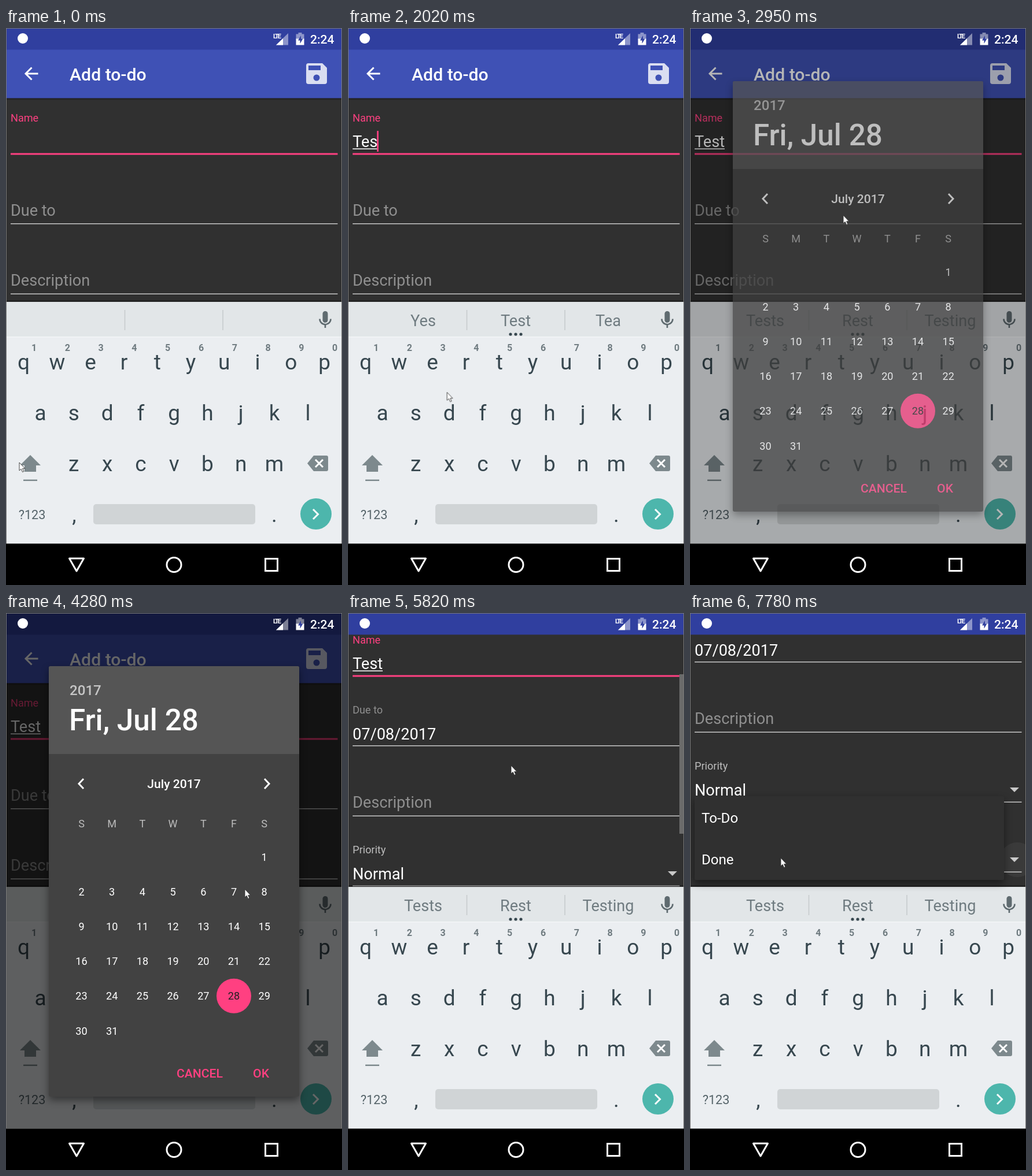
An HTML page that plays this animation: 581x964 px, repeating every 8 s.

```html
<!DOCTYPE html>
<html lang="en">
<head>
<meta charset="utf-8">
<title>Add to-do</title>
<style>
html, body { margin: 0; width: 100%; height: 100%; overflow: hidden; background: #000; }
svg { display: block; width: 100%; height: 100%; font-family: Roboto, "Open Sans", sans-serif; }
.mid { text-anchor: middle; }
.med { font-weight: 500; }
.f12 { font-size: 18.1px; }
.f14 { font-size: 21.1px; }
.f16 { font-size: 24.1px; }
.f18 { font-size: 27.1px; }
.white { fill: #fff; }
.hint { fill: #8f8f8f; }
.pink { fill: #ff4081; }
.rule { fill: #c8c8c8; }
.key { font-size: 37px; fill: #37474f; }
.sug { font-size: 27.1px; fill: #6f7b80; }
.line { fill: none; stroke: #fff; stroke-width: 3; }
.raised { filter: drop-shadow(0 2px 2px rgba(0, 0, 0, .4)); }
.floating { filter: drop-shadow(0 6px 7px rgba(0, 0, 0, .45)); }

#cursor, #scroll, #thumb, #dim, #dialog, #due, #menu, #ripple { animation: 8s linear infinite; }
#cursor { animation-name: cursor; }
#scroll { animation-name: scroll; }
#thumb { animation-name: thumb; }
#dim { animation-name: dim; }
#dialog { animation-name: dialog; }
#due { animation-name: due; }
#menu { animation-name: menu; }
#ripple { animation-name: ripple; transform-origin: 566px 427px; }

@keyframes cursor {
  0%, 1.6% { transform: translate(23px, 752px); }
  3.4%, 5.6% { transform: translate(35px, 755px); }
  10%, 13.1% { transform: translate(262px, 575px); }
  15.5%, 18.5% { transform: translate(165px, 573px); }
  22.5%, 24% { transform: translate(120px, 660px); }
  27.5%, 28.75% { transform: translate(262px, 578px); }
  32.25%, 35.4% { transform: translate(181px, 352px); }
  40.25%, 41.6% { transform: translate(455px, 261px); }
  43.25%, 46.75% { transform: translate(446px, 680px); }
  52.5%, 55.25% { transform: translate(413px, 478px); }
  56.25%, 58.7% { transform: translate(447px, 480px); }
  60.6%, 62.3% { transform: translate(440px, 790px); }
  65.4%, 67.4% { transform: translate(324px, 313px); }
  69% { transform: translate(286px, 373px); }
  72.5%, 74.6% { transform: translate(282px, 264px); }
  78%, 79% { transform: translate(280px, 119px); }
  84.25%, 88.75% { transform: translate(556px, 420px); }
  95%, 100% { transform: translate(157px, 424px); }
}
@keyframes scroll {
  0%, 69% { transform: none; }
  72.5%, 74.6% { transform: translateY(-109px); }
  78%, 100% { transform: translateY(-254px); }
}
@keyframes thumb {
  0%, 69% { transform: none; opacity: 0; }
  69.3% { opacity: 1; }
  72.5%, 74.6% { transform: translateY(69px); }
  78% { transform: translateY(161px); }
  81% { opacity: 1; }
  84%, 100% { transform: translateY(161px); opacity: 0; }
}
@keyframes dim {
  0%, 35.4% { opacity: 0; }
  38.5%, 62.3% { opacity: .6; }
  65.4%, 67.2% { opacity: .18; }
  69%, 100% { opacity: 0; }
}
@keyframes dialog {
  0%, 35.4% { opacity: 0; }
  37.5%, 62.3% { opacity: 1; }
  64.5%, 100% { opacity: 0; }
}
@keyframes due {
  0%, 63.9% { transform: translate(8px, 325px) scale(1.497); }
  65.4%, 67.2% { transform: translate(8px, 300px); }
  68.4%, 100% { transform: translate(8px, 283px); }
}
@keyframes menu {
  0%, 89.5% { opacity: 0; }
  92%, 100% { opacity: 1; }
}
@keyframes ripple {
  0%, 87.7% { opacity: 0; transform: scale(.4); }
  89.5% { opacity: .1; transform: none; }
  97%, 100% { opacity: .05; transform: none; }
}
</style>
</head>
<body>
<svg viewBox="0 0 581 964">
  <defs>
    <clipPath id="page"><rect x="1" y="37" width="579" height="437"/></clipPath>
    <linearGradient id="shade" x2="0" y2="1">
      <stop stop-opacity=".35"/><stop offset="1" stop-opacity="0"/>
    </linearGradient>
  </defs>
  <rect width="581" height="964" fill="#777"/>

  <!-- form -->
  <g clip-path="url(#page)">
    <rect x="1" y="37" width="579" height="437" fill="#303030"/>
    <g id="scroll">
      <rect x="1" y="37" width="579" height="84.500" fill="#3f51b5"/>
      <rect x="1" y="121.500" width="579" height="4" fill="url(#shade)"/>
      <path class="line" d="M55.500 79H34M44.500 68.500L34 79l10.500 10.500"/>
      <text class="white med" x="110" y="91" font-size="30.200">Add to-do</text>
      <path fill="#dadef1" fill-rule="evenodd" d="M523 61h24l8 8v24a4 4 0 0 1-4 4h-28a4 4 0 0 1-4-4v-28a4 4 0 0 1 4-4zM523 65v8h21v-8zM537 80.500a5.500 5.500 0 0 0 0 11a5.500 5.500 0 0 0 0-11z"/>

      <text class="pink f12" x="8" y="162">Name</text>
      <g id="typed"></g>
      <rect class="pink" x="8" y="216.500" width="565.500" height="3"/>

      <text id="due" class="hint f12">Due to</text>
      <text class="white f18" x="8" y="328" data-on="5110-8000">07/08/2017</text>
      <rect class="rule" x="8" y="338" width="565.500" height="1.500"/>
      <g data-on="2580-2950">
        <text class="f18" x="8" y="325" fill="#c4c4c4">Due to</text>
        <rect class="pink" x="8" y="338" width="565.500" height="3"/>
      </g>

      <text class="hint f18" x="8" y="446">Description</text>
      <rect class="rule" x="8" y="459.500" width="565.500" height="1.500"/>

      <g id="priority"></g>
      <g id="status"></g>
    </g>
    <rect id="thumb" x="573" y="37" width="7" height="276" fill="#6b6b6b"/>
    <circle id="ripple" class="white" cx="566" cy="427" r="30"/>
    <rect x="1" y="471" width="579" height="3" opacity=".25"/>
  </g>

  <rect x="1" y="1" width="579" height="36.500" fill="#303f9f"/>

  <!-- keyboard -->
  <rect x="1" y="474" width="579" height="418.500" fill="#ebeef1"/>
  <rect x="1" y="474" width="579" height="60" fill="#e2e6e8"/>
  <rect x="1" y="534" width="579" height="1.500" fill="#f4f6f7"/>
  <path d="M205.500 488v35M375 488v35" stroke="#c5cacc" stroke-width="1.500"/>
  <g id="suggestions"></g>
  <g fill="none" stroke="#5f6b70" stroke-width="2.600">
    <rect x="547.500" y="490" width="9" height="20" rx="4.500" fill="#5f6b70" stroke="none"/>
    <path d="M542.500 503.500a9.500 9.500 0 0 0 19 0M552 513v6"/>
  </g>
  <g id="hints" class="mid" font-size="16" font-weight="700" fill="#6f7b80"></g>
  <g id="lower" data-on="0-270 960-8000"></g>
  <g id="upper" data-on="270-960"></g>
  <path id="shift" fill="#7d898d" d="M42 739l18 18h-8v11h-20v-11h-8zM30 781.500h24v2.500h-24z"/>
  <path fill="#4db6ac" data-on="270-960" d="M42 739l18 18h-8v11h-20v-11h-8zM30 781.500h24v2.500h-24z"/>
  <path fill="#7d898d" d="M521 753.500l11-13.500h22a3 3 0 0 1 3 3v21a3 3 0 0 1-3 3h-22z"/>
  <path class="line" d="M535 747l13 13M548 747l-13 13"/>
  <text class="mid" x="45" y="849.500" font-size="21.600" fill="#56646a">?123</text>
  <text class="key mid" x="118" y="855">,</text>
  <text class="key mid" x="464" y="855">.</text>
  <rect x="151" y="824" width="280" height="35" rx="5" fill="#d0d4d6"/>
  <circle cx="536" cy="841" r="27" fill="#4db6ac"/>
  <path class="line" d="M531 833l8.500 8.500l-8.500 8.500"/>
  <g id="popups"></g>

  <!-- drop-down list -->
  <g id="menu">
    <rect class="floating" x="8" y="317" width="535" height="145" rx="2" fill="#303030"/>
    <text class="white f16" x="20" y="362.500">To-Do</text>
    <text class="white f16" x="20" y="435">Done</text>
  </g>

  <rect id="dim" x="1" y="1" width="579" height="891.500"/>

  <!-- system bars -->
  <g class="white">
    <circle cx="29" cy="18" r="9"/>
    <text x="462" y="17.500" font-size="11" font-weight="700" textLength="14" lengthAdjust="spacing">LTE</text>
    <path d="M488 9v20.500h-21z" opacity=".45"/>
    <path d="M479 18v11.500h-12z"/>
    <path d="M505.500 8h6v2.500h4v10h-14v-10h4z" opacity=".45"/>
    <path d="M501.500 18.500h14v11h-14z"/>
    <path d="M510 13l-5 8.500h3.500v5.500l5-8.500h-3.500z" fill="#303f9f"/>
    <text class="med f14" x="526" y="26.500">2:24</text>
  </g>
  <rect y="892.500" width="581" height="71.500"/>
  <path class="line" stroke-linejoin="round" d="M109.500 918h25l-12.500 22z"/>
  <circle class="line" cx="290.500" cy="929" r="12.500"/>
  <rect class="line" x="448.500" y="918.500" width="21" height="21"/>

  <!-- date picker -->
  <g id="dialog">
    <rect class="floating" x="74" y="92" width="433" height="745" rx="3" fill="#424242"/>
    <path d="M74 244V95a3 3 0 0 1 3-3h427a3 3 0 0 1 3 3v149z" fill="#555"/>
    <text class="med f16" x="110" y="142" fill="#c6c6c6">2017</text>
    <g class="white med" font-size="51.300">
      <text x="109" y="202.500" data-on="0-4560">Fri, Jul 28</text>
      <text x="109" y="202.500" data-on="4560-8000">Sat, Jul 8</text>
    </g>
    <path class="line" d="M134 287l-8 8.500l8 8.500M447 287l8 8.500l-8 8.500"/>
    <text class="white med f14 mid" x="290.500" y="303">July 2017</text>
    <g id="days" class="f12 mid"></g>
    <g class="pink med f14 mid">
      <text x="335" y="804">CANCEL</text>
      <text x="441" y="804">OK</text>
    </g>
  </g>

  <path id="cursor" fill="#fff" stroke="#333" stroke-width=".9" d="M0 0V14L3.200 11.200L5.600 16.500L7.900 15.400L5.600 10.400H9.800Z"/>
</svg>

<script>
const LOOP = 8000;
const add = (id, markup) => { document.getElementById(id).innerHTML += markup; };
const text = (cls, x, y, s) => `<text class="${cls}" x="${x}" y="${y}">${s}</text>`;
const during = (span, markup) => `<g data-on="${span}">${markup}</g>`;

// Name field: word so far, its right edge, time shown
const words = [["", 8, "130-630"], ["T", 24, "960-1480"], ["Te", 37.5, "1480-1910"],
  ["Tes", 51, "1910-2290"], ["Test", 60, "2290-8000"]];
for (const [word, end, span] of words) {
  const caret = `<rect class="pink" x="${end - 1}" y="178" width="2.800" height="36"/>`;
  const shown = word === "Test" ? during("2290-2830", caret) : caret;
  add("typed", during(span, text("white f18", 8, 206, word) +
    `<rect class="white" x="8" y="208.500" width="${end - 8}" height="1.500"/>` + shown));
}

// Spinners
const spinner = (id, y, label, value) => add(id,
  `<text class="f12" x="8" y="${y}" fill="#bdbdbd">${label}</text>` +
  text("white f18", 8, y + 44.5, value) +
  `<path class="rule" d="M553 ${y + 31}h16l-8 8z"/>` +
  `<rect class="rule" x="8" y="${y + 55.5}" width="565.500" height="1.500"/>`);
spinner("priority", 525, "Priority", "Normal");
spinner("status", 646, "Status", "To-Do");

// Suggestions
const dots = [281, 290, 299].map(x => `<circle cx="${x}" cy="530" r="2.600" fill="#37474f"/>`).join("");
const suggest = (span, list) => add("suggestions",
  during(span, list.map((s, i) => text("sug mid", 130 + 160 * i, 516, s)).join("") + dots));
suggest("960-1480", ["To", "The", "This"]);
suggest("1480-1910", ["Ten", "The", "Tell"]);
suggest("1910-2290", ["Yes", "Test", "Tea"]);
suggest("2290-8000", ["Tests", "Rest", "Testing"]);

// Keys
const PITCH = 57.8;
const rows = [["qwertyuiop", 30.5], ["asdfghjkl", 59.5], ["zxcvbnm", 117.3]];
rows.forEach(([keys, left], r) => [...keys].forEach((k, i) => {
  const x = left + PITCH * i, y = 591 + 88 * r;
  add("lower", text("key mid", x, y, k));
  add("upper", text("key mid", x, y, k.toUpperCase()));
  if (!r) add("hints", `<text x="${x + 18}" y="559">${(i + 1) % 10}</text>`);
}));

const popup = (span, key, x, y) => add("popups", during(span,
  `<rect class="raised" x="${x - 36.5}" y="${y}" width="73" height="172.500" rx="3" fill="#cfd3d5"/>` +
  `<text class="mid" x="${x}" y="${y + 63.5}" font-size="54" fill="#37474f">${key}</text>` +
  [16, 23.5, 31].map(d => `<circle cx="${x + d}" cy="${y + 82}" r="2" fill="#929a9d"/>`).join("")));
popup("850-1020", "T", 262, 437);
popup("1240-1480", "e", 146, 437);
popup("1770-1910", "s", 117, 525);
popup("2160-2290", "t", 262, 437);

// Calendar
const col = c => 130.5 + 52.7 * c, row = r => 422 + 60.2 * r;
const day = (d, fill, disc) => {
  const x = col((d + 5) % 7), y = row(Math.floor((d + 5) / 7));
  return (disc ? `<circle class="pink" cx="${x}" cy="${y}" r="30"/>` : "") +
    `<text x="${x}" y="${y + 6.5}" fill="${fill}">${d}</text>`;
};
[..."SMTWTFS"].forEach((s, c) => add("days", `<text x="${col(c)}" y="370.500" fill="#bdbdbd">${s}</text>`));
for (let d = 1; d <= 31; d++) if (d !== 8 && d !== 28) add("days", day(d, "#fff"));
add("days", during("0-4560", day(8, "#fff") + day(28, "#212121", true)));
add("days", during("4560-8000", day(8, "#212121", true) + day(28, "#ff4081")));

// Turn each data-on list of "from-to" times into a stepped keyframe rule
let css = "";
document.querySelectorAll("[data-on]").forEach((el, i) => {
  const frames = el.dataset.on.split(" ").map(span => {
    const [from, to] = span.split("-").map(ms => ms / LOOP * 100);
    return `${from}%{opacity:1}${to}%{opacity:0}`;
  });
  css += `@keyframes on${i}{0%{opacity:0}${frames.join("")}100%{opacity:0}}`;
  el.style.animation = `on${i} ${LOOP}ms step-end infinite`;
});
document.head.appendChild(document.createElement("style")).textContent = css;
</script>
</body>
</html>
```
